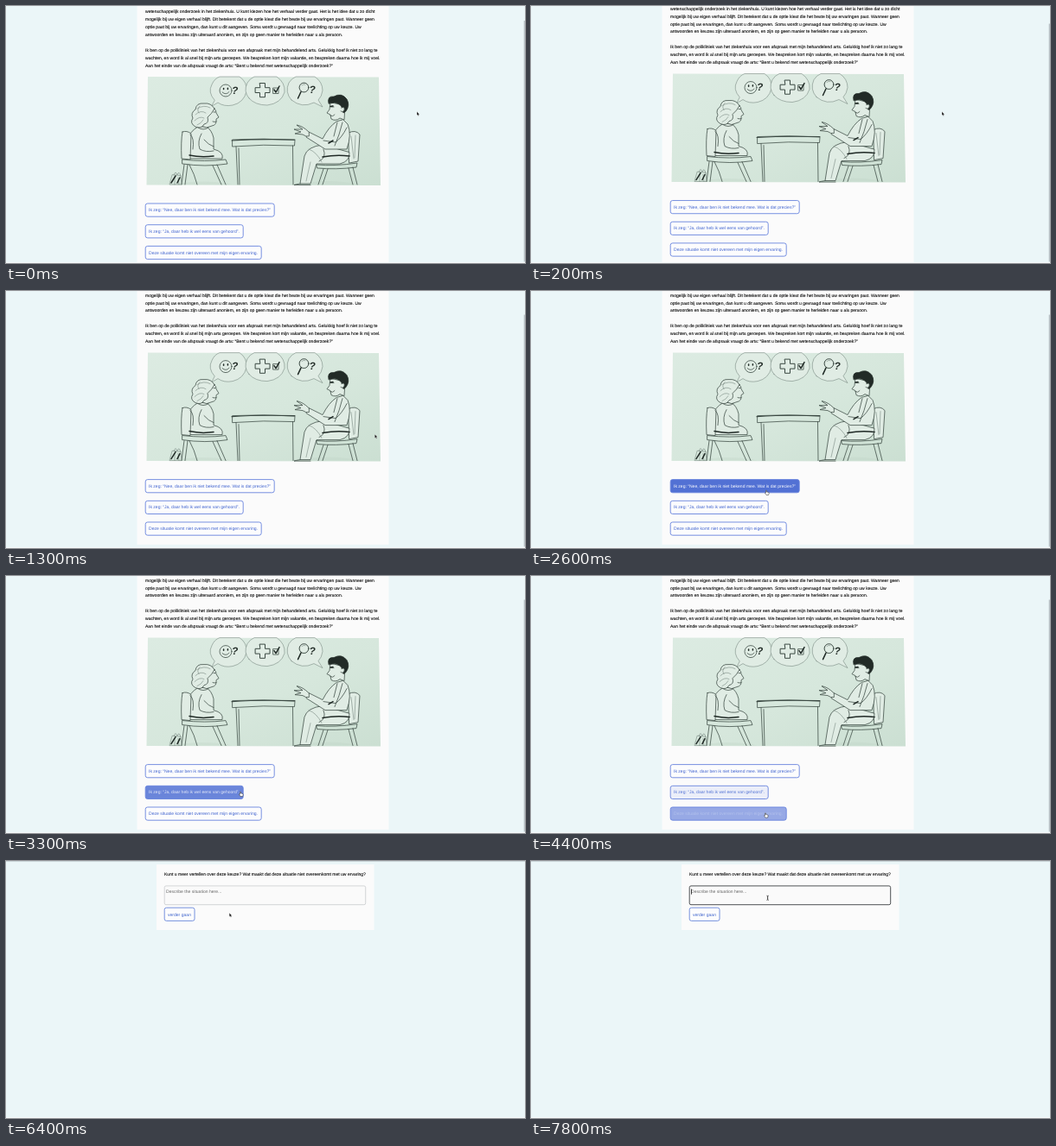
These frames come from a looping animation (600 by 298 pixels, 8 s). An HTML page:

```html
<!DOCTYPE html>
<html lang="nl">
<head>
<meta charset="utf-8">
<title>Keuzeverhaal</title>
<style>
  html, body { margin: 0; width: 100%; height: 100%; overflow: hidden; background: #ebf6f8; }
  svg { display: block; width: 600px; height: 298px; }
  text { font: 5.05px "Liberation Sans", Arial, sans-serif; text-rendering: geometricPrecision; white-space: pre; }
  .body text, .ask { fill: #0c0c0c; stroke: #0c0c0c; stroke-width: .1; }
  .ink { fill: none; stroke: #3a4842; stroke-width: .75; stroke-linecap: round; stroke-linejoin: round; }
  .soft { stroke: #71817a; stroke-width: .55; }
  .bold { stroke: #1f2925; stroke-width: 1.5; }
  .dark { fill: #222b27; stroke: #222b27; }
  .light { fill: #e0ece4; }
  .shade { fill: #bccfc4; stroke: none; }
  .mark { fill: #26302b; font-size: 12px; font-weight: bold; font-style: italic; }
</style>
</head>
<body>
<svg viewBox="0 0 600 298">
  <defs>
    <linearGradient id="wash" x1="0" y1="0" x2="1" y2="1">
      <stop offset="0" stop-color="#dcebe2"/>
      <stop offset=".55" stop-color="#d6e7dc"/>
      <stop offset="1" stop-color="#cbdfd2"/>
    </linearGradient>
  </defs>
  <rect width="600" height="298" fill="#ebf6f8"/>

  <g id="story">
    <g id="scroll">
      <rect x="151.5" y="-20" width="291" height="324.5" fill="#fbfbfb"/>
      <g id="body" class="body"></g>

      <g id="drawing">
        <path d="M164 82L431 82.5L433 208L162.5 207.5Z" fill="url(#wash)"/>
        <path class="shade" opacity=".3" d="M190 207Q230 200 262 207ZM334 207Q372 199 410 207Z"/>

        <!-- thought bubbles -->
        <g class="ink soft">
          <path class="light" d="M241 109Q233 100 238 91Q241 84 247 82H270Q279 88 278 99Q275 112 262 115Q252 117 245 112L238 116Z"/>
          <path class="light" d="M281 107Q274 99 279 89Q282 84 287 82H313Q323 89 322 100Q318 113 302 115Q288 115 281 107Z"/>
          <path class="light" d="M330 109Q322 100 327 89Q330 84 335 82H357Q366 88 366 98Q365 105 361 109L366 117L356 112Q342 119 330 109Z"/>
        </g>
        <g class="ink">
          <circle cx="254" cy="98" r="7"/>
          <path class="bold" d="M251.6 95.4v1.2M256.4 95.2v1.2"/>
          <path d="M250 100Q254.500 104 258 99.500"/>
          <path stroke-width="1" d="M293.500 89.500h6v5.200h5.500v5.800h-5.500v5.200h-6v-5.200h-5.400v-5.800h5.400Z"/>
          <path d="M309 95h6v6.500h-6Z"/>
          <path class="bold" d="M310 97l2 3l4-7"/>
          <circle cx="344.500" cy="94.500" r="5.400" stroke-width="1"/>
          <path class="bold" d="M341 99.500L337.500 107"/>
          <path class="soft" d="M342 92q2-2 4-1"/>
        </g>
        <text class="mark" x="261" y="101.500">?</text>
        <text class="mark" x="350.500" y="101">?</text>

        <!-- table -->
        <g class="ink">
          <path d="M262 155Q298 153 334 155.500L333.500 162Q298 160 262 163Z"/>
          <path d="M266 163L268 207M269 165L270 207M331.500 162L332 207"/>
          <path stroke-width="1.100" d="M261 156Q292 154 334 155"/>
        </g>

        <!-- left visitor and chair -->
        <g class="ink">
          <path class="light" d="M222 140Q212 145 209 158L208 177H250Q252 169 240 166L240 153Q238 144 232 140Z"/>
          <path class="light" d="M235 119Q243 117 243 124L246 129L243 131Q244 138 238 139L232 141L225 139Z"/>
          <path class="light" d="M241 119Q237 112 229 113Q220 112 219 120Q213 124 216 130Q212 136 219 140Q226 143 229 137Q235 136 233 129Q238 125 241 119Z"/>
          <path class="soft" d="M221 119Q229 114 236 118M219 126Q225 120 231 124M218 133Q224 127 229 130M221 138Q226 136 228 132M224 116q-4 4-1 8"/>
          <path d="M240 123h2M239 134q2 1 4 0M226 148Q221 157 224 166Q231 170 240 168M229 155Q234 161 240 163M222 141Q228 145 234 141"/>
          <path class="light" d="M204 146Q202 157 203 177L213 178L214 148Q209 144 204 146Z"/>
          <path d="M213 149Q218 153 216 166"/>
          <path class="bold" stroke-width="2" d="M212 173Q225 176 240 174"/>
          <path d="M204 178Q230 181 254 178L256 183Q230 187 204 183Z"/>
          <path d="M206 184L203 207M210 184L207 207M239 185L249 207M244 184L254 207M212 184Q218 195 221 207"/>
          <path class="soft" d="M192 196L189 207H203L202 197ZM194 196Q196 190 198 196Q200 190 202 197M195 199v8M199 199l1 8"/>
          <path class="bold" d="M191 205l5-8M198 205l3-6"/>
        </g>

        <!-- right host and chair -->
        <g class="ink">
          <path class="light" d="M396 147Q404 143 409 149L407 180L397 182Z"/>
          <path class="light" d="M366 161Q348 163 345 174L340 206H352L359 183L386 183Q398 180 397 170Z"/>
          <path class="light" d="M382 134Q373 140 366 154L350 146L347 152L369 166L394 166Q400 149 395 137L390 132Z"/>
          <path class="light" d="M350 146Q343 139 336 138L343 143L333 143L341 146L334 148L343 149Q347 152 350 151Z"/>
          <path class="light" d="M375 112L374 120L371 124L375 126L376 131Q381 134 386 130L391 132L392 116Z"/>
          <path class="dark" d="M373 113Q371 104 379 105Q388 100 394 108Q398 115 393 122L390 124L388 117Q386 113 380 112Z"/>
          <path class="light" d="M388 118q4-2 3 3q-2 3-4 1"/>
          <path d="M376 117h3M375 127q3 2 5-1M383 135L379 151M389 135L385 149L380 162M394 141Q388 153 381 158L367 156M367 166Q371 176 362 180"/>
          <path class="bold" d="M373 159l5-3M375 116.500l3-.5"/>
          <path class="soft" d="M350 166Q359 169 365 181M352 181L347 203M399 151L402 177M404 150L403 176"/>
          <path class="bold" stroke-width="2" d="M366 175Q382 172 397 174"/>
          <path d="M359 184Q380 186 406 182L405 187Q381 190 360 188Z"/>
          <path d="M367 189L361 207M372 189L366 207M396 188L401 207M401 187L406 207M340 206Q334 207 333 207.500H352"/>
        </g>
      </g>
      <g id="choices"></g>
    </g>
    <path id="thumb" stroke="#b3bcc0" stroke-width="1.2"/>
  </g>

  <g id="form">
    <rect width="600" height=".8" fill="#c3cfd3"/>
    <rect x="174" y="4" width="251.500" height="76" fill="#fbfbfb"/>
    <g id="fields">
      <text class="ask" x="183" y="17.300">Kunt u meer vertellen over deze keuze? Wat maakt dat deze situatie niet overeenkomt met uw ervaring?</text>
      <rect id="box" x="183.200" y="28.900" width="232.500" height="21.800" rx="1.800" fill="#fafafa"/>
      <text x="185" y="37.400" fill="#666">Describe the situation here...</text>
      <rect id="caret" x="185.100" y="32.500" width=".8" height="6.200" fill="#111"/>
      <rect x="183.200" y="54.200" width="34.800" height="15.200" rx="2.300" fill="#fdfdfd" stroke="#5577d6" stroke-width=".8"/>
      <text x="187" y="63.700" fill="#3f64cd">verder gaan</text>
    </g>
  </g>

  <rect y="297" width="600" height="1" fill="#f8fbfb"/>
  <g id="pointer">
    <path id="arrow" d="M0 0V4.300L1 3.500L1.700 5L2.500 4.600L1.800 3.200H3.100Z" fill="#111" stroke="#fff" stroke-width=".3"/>
    <path id="hand" d="M0 .4Q.6-.4 1.100.4V2L3.300 2.500Q3.900 3 3.500 4.300L3 5.600H.6L-1.100 3.300Q-.9 2.600 0 3.200Z" fill="#fff" stroke="#222" stroke-width=".5"/>
    <path id="beam" d="M-1.200-2.600Q0-2.600 0-2V2Q0 2.600-1.200 2.600M1.200-2.600Q0-2.600 0-2V2Q0 2.600 1.200 2.600" fill="none" stroke="#222" stroke-width=".6"/>
  </g>
</svg>

<script>
const LOOP = 8000, STEP = 100;
const $ = id => document.getElementById(id);

const lines = [
  [8.2, 'wetenschappelijk onderzoek in het ziekenhuis. U kunt kiezen hoe het verhaal verder gaat. Het is het idee dat u zo dicht'],
  [17.1, 'mogelijk bij uw eigen verhaal blijft. Dit betekent dat u de optie kiest die het beste bij uw ervaringen past. Wanneer geen'],
  [26, 'optie past bij uw ervaringen, dan kunt u dit aangeven. Soms wordt u gevraagd naar toelichting op uw keuze. Uw'],
  [34.9, 'antwoorden en keuzes zijn uiteraard anoniem, en zijn op geen manier te herleiden naar u als persoon.'],
  [52.7, 'Ik ben op de polikliniek van het ziekenhuis voor een afspraak met mijn behandelend arts. Gelukkig hoef ik niet zo lang te'],
  [61.6, 'wachten, en word ik al snel bij mijn arts geroepen. We bespreken kort mijn vakantie, en bespreken daarna hoe ik mij voel.'],
  [70.5, 'Aan het einde van de afspraak vraagt de arts: “Bent u bekend met wetenschappelijk onderzoek?”']
];
$('body').innerHTML = lines.map(([y, s]) => `<text x="161" y="${y}">${s}</text>`).join('');

// hover: [time, amount] keys
const choices = [
  { y: 229, w: 149, label: 'Ik zeg: “Nee, daar ben ik niet bekend mee. Wat is dat precies?”',
    hover: [[2000, 0], [2300, 1], [2700, 1], [3050, 0]] },
  { y: 253.7, w: 113, label: 'Ik zeg: “Ja, daar heb ik wel eens van gehoord”.',
    hover: [[3000, 0], [3350, 1], [4050, 1], [4440, 0]] },
  { y: 278.4, w: 134, label: 'Deze situatie komt niet overeen met mijn eigen ervaring.',
    hover: [[4150, 0], [4570, 1]] }
];
$('choices').innerHTML = choices.map(c => `<g>
  <rect x="161.200" y="${c.y}" width="${c.w}" height="15.200" rx="2.500" stroke="#6884de" stroke-width=".9"/>
  <text x="165" y="${c.y + 9.2}">${c.label}</text></g>`).join('');
choices.forEach((c, i) => [c.rect, c.text] = $('choices').children[i].children);

const scrollKeys = [[0, 0], [100, 1.2], [400, 8], [500, 10.4]];
const pointerKeys = [
  [700, 475, 122.5], [1600, 402, 188], [2300, 271.5, 231], [2600, 271.5, 231],
  [3300, 270.5, 250], [3600, 270.5, 250], [3900, 270.5, 253], [4100, 270.5, 260],
  [4300, 270.5, 274.6], [5500, 270.5, 274.6], [6200, 259, 83], [6400, 258.2, 60.2],
  [7000, 273.6, 42.8]
];
const fadeKeys = [[5300, 0], [5700, 1]];

// linear interpolation through [time, ...values] keys
function at(keys, t) {
  const n = keys.findIndex(k => k[0] > t);
  if (n === 0) return keys[0].slice(1);
  if (n < 0) return keys[keys.length - 1].slice(1);
  const a = keys[n - 1], b = keys[n], p = (t - a[0]) / (b[0] - a[0]);
  return a.slice(1).map((v, i) => v + (b[i + 1] - v) * p);
}
const mix = (a, b, p) => `rgb(${a.map((v, i) => Math.round(v + (b[i] - v) * p))})`;
const show = (id, on) => $(id).setAttribute('visibility', on ? 'visible' : 'hidden');
const set = (el, name, value) => el.setAttribute(name, value);

function draw(t) {
  const onForm = t >= 5000;
  const [scroll] = at(scrollKeys, t);
  const [x, y] = at(pointerKeys, t);
  show('story', !onForm);
  show('form', onForm);

  set($('scroll'), 'transform', `translate(0 ${-scroll})`);
  set($('thumb'), 'd', `M599.300 ${17 + scroll}V296.500`);
  for (const c of choices) {
    const [h] = at(c.hover, t);
    set(c.rect, 'fill', mix([252, 252, 253], [82, 113, 212], h));
    set(c.text, 'fill', mix([65, 100, 207], [255, 255, 255], h));
  }

  set($('fields'), 'opacity', at(fadeKeys, t)[0]);
  const focus = t >= 7000;
  set($('box'), 'stroke', focus ? '#3c3f42' : '#c2c5c7');
  set($('box'), 'stroke-width', focus ? 0.9 : 0.7);
  set($('caret'), 'opacity', t >= 7800 ? 1 : 0);

  const overChoice = !onForm && choices.some(c =>
    x > 161 && x < 161 + c.w && y > c.y - scroll && y < c.y - scroll + 15.2);
  const overBox = onForm && y > 29 && y < 50.5;
  set($('pointer'), 'transform', `translate(${x} ${y})`);
  show('hand', overChoice);
  show('beam', overBox);
  show('arrow', !overChoice && !overBox);
}

function tick() {
  const t = performance.now() % LOOP;
  draw(Math.floor(t / STEP) * STEP);
  requestAnimationFrame(tick);
}
tick();
</script>
</body>
</html>
```
